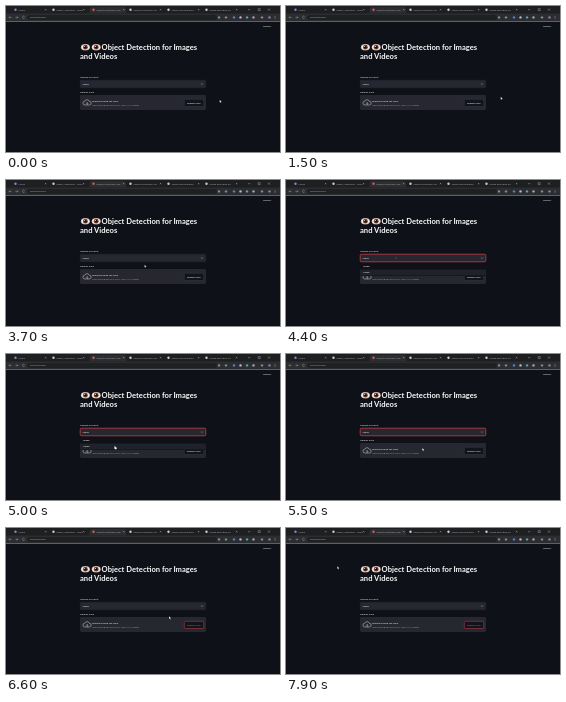
An HTML page that plays this animation: 274x146 px, repeating every 8000 ms.

```html
<!DOCTYPE html>
<html lang="en">
<head>
<meta charset="utf-8">
<title>Object detection app</title>
<style>
  html, body { margin: 0; width: 100%; height: 100%; overflow: hidden; background: #0e1117; }
  svg { display: block; width: 274px; height: 146px; }
  text { font-family: Lato, "Open Sans", sans-serif; fill: #fafafa; white-space: pre; }
  .small { font-size: 2.55px; }
  .title { font-size: 7.6px; font-weight: 700; }
  .chrome text { font-size: 2.5px; fill: #a5a7aa; }
  .line { fill: none; stroke: #b9bbc0; stroke-width: .4; }
</style>
</head>
<body>
<svg viewBox="0 0 274 146">
  <defs>
    <linearGradient id="accent">
      <stop offset="0" stop-color="#b9473f"/>
      <stop offset="1" stop-color="#9c5546"/>
    </linearGradient>
    <g id="eye">
      <ellipse rx="4.5" ry="3.3" fill="#c99a8c"/>
      <ellipse rx="4" ry="2.6" fill="#f1eeea"/>
      <circle r="2.4" fill="#6b4437"/>
      <circle r="1.3" fill="#17110f"/>
      <circle cx="-.7" cy="-.8" r=".5" fill="#fff"/>
    </g>
  </defs>
  <rect width="274" height="146" fill="#0e1117"/>

  <g class="chrome">
    <rect width="274" height="8" fill="#1e1f21"/>
    <rect y="7.5" width="274" height="7.7" fill="#2c2d30"/>
    <path d="M82 7.6Q83.5 7.4 83.5 6V3Q83.5 1 85.5 1H118Q120 1 120 3V6Q120 7.4 121.5 7.6Z" fill="#2c2d30"/>
    <rect x="21" y="8.9" width="190" height="5" rx="2.5" fill="#1f2022"/>
    <g id="tabs"></g>
    <text x="24" y="12.4">localhost:8501</text>
    <path class="line" d="M5.5 11.4H3l1-1m-1 1l1 1M9.5 11.4H12l-1-1m1 1l-1 1M18.6 10.5a1.2 1.2 0 1 0 .1 1.5"/>
    <g id="tools"></g>
    <path class="line" d="M242 3.7h2.3M252.2 2.6h2v2h-2zM262 2.6l2 2m0-2l-2 2"/>
    <path d="M269 10v3" stroke="#c5c7ca" stroke-width=".6" stroke-dasharray=".6 .5"/>
  </g>
  <rect y="15.1" width="274" height=".9" fill="url(#accent)"/>

  <text class="small" x="257.3" y="21.3">Deploy</text>
  <use href="#eye" x="79.4" y="41.2"/>
  <use href="#eye" x="90.2" y="41.2"/>
  <text class="title" x="95.6" y="44">Object Detection for Images</text>
  <text class="title" x="74" y="53">and Videos</text>

  <text class="small" x="74" y="72.3">Choose an Input</text>
  <rect id="select" x="74.2" y="74.2" width="125.6" height="7.6" rx="1.3" fill="#262730" stroke-width=".6"/>
  <text class="small" x="76.5" y="79">Video</text>
  <path class="line" d="M194.8 77.5l1.2 1.1 1.2-1.1"/>

  <text class="small" x="74" y="87.3">Upload a file</text>
  <rect x="74" y="89" width="126" height="15" rx="1.4" fill="#262730"/>
  <path d="M79 99a1.9 1.9 0 0 1-.2-3.8a2.4 2.4 0 0 1 4.5.1a1.8 1.8 0 0 1 .1 3.7zM81.2 99v-2.4m-.9.9l.9-.9.9.9" fill="none" stroke="#c7c9d0" stroke-width=".55"/>
  <text class="small" x="86.3" y="95.9">Drag and drop file here</text>
  <text x="86.3" y="99.9" font-size="2.25" style="fill:#9b9da5">Limit 200MB per file • MP4, MOV, AVI, MPEG4</text>
  <rect id="button" x="178.3" y="93.3" width="19.4" height="7.2" rx="1.3" fill="#11141c" stroke-width=".4"/>
  <text id="browse" class="small" x="181.2" y="97.8">Browse files</text>

  <g id="menu">
    <rect x="74" y="83" width="126" height="13" rx="1.3" fill="#0e1117"/>
    <rect x="74" y="89.5" width="126" height="6" fill="#1f222b"/>
    <text class="small" x="77" y="87.1">Image</text>
    <text class="small" x="77" y="93.2">Video</text>
  </g>

  <g id="cursor">
    <path id="arrow" d="M0 0V2.8L.7 2.2L1.2 3.2L1.6 3L1.2 2H2Z" fill="#fff" stroke="#111" stroke-width=".15"/>
    <path id="hand" d="M.5 0Q.9 0 .9 .5V1.3L2.2 1.6Q2.6 1.8 2.4 2.5L2.1 3.5H.6L-.5 2Q-.4 1.5 .1 1.9V.5Q.1 0 .5 0Z" fill="#fff" stroke="#111" stroke-width=".15"/>
    <path id="beam" d="M0-1.2V1.2" stroke="#8b8d93" stroke-width=".3"/>
  </g>
</svg>
<script>
const LOOP = 8000;
const RED = '#ff4b4b';
const $ = id => document.getElementById(id);

const tabs = [
  [8, '#8b7cf0', 'Home'],
  [46, '#c9cbd0', 'object_detection - main'],
  [86, '#e4574f', 'Object Detection App'],
  [123, '#c9cbd0', 'Object Detection Vid'],
  [161, '#c9cbd0', 'Video processing do'],
  [199, '#c9cbd0', 'Image detection no']
];
$('tabs').innerHTML = tabs.map(([x, color, label]) => `
  <circle cx="${x + 1.5}" cy="3.7" r="1.2" fill="${color}"/>
  <text x="${x + 4.5}" y="4.6">${label}</text>
  <path class="line" d="M${x + 31} 3l1.3 1.3m0-1.3l-1.3 1.3"/>`).join('');

const tools = [[213, '#85878a'], [220, '#85878a'], [228, '#4b83d6'], [234.5, '#b9bcc2'],
  [241, '#59a0a8'], [247.5, '#a7a9ae'], [256, '#85878a'], [263.5, '#8f7bb8']];
$('tools').innerHTML = tools.map(([x, color]) =>
  `<circle cx="${x}" cy="11.4" r="1.2" fill="${color}"/>`).join('');

// time, x, y
const path = [
  [0, 213.7, 93.8], [500, 213.7, 93.8], [900, 214.5, 92], [1500, 214.7, 90.8],
  [1900, 216.5, 89], [2300, 223, 86], [2700, 224.3, 85], [2800, 196, 94],
  [3000, 181, 95], [3400, 160, 92], [3600, 150, 88], [3900, 116, 78], [4400, 110, 78],
  [4700, 109, 86], [5000, 108.4, 91.8], [5300, 108.4, 92], [5600, 150, 95],
  [5900, 186.3, 96.8], [6400, 186.3, 96.8], [6800, 140, 80],
  [7100, 84, 55], [7400, 68, 47], [7800, 51.3, 38.3], [8000, 51.3, 38.3]
];

function cursorAt(t) {
  const i = path.findIndex(p => p[0] > t);
  const [a, b] = [path[i - 1], path[i]];
  const k = (t - a[0]) / (b[0] - a[0]);
  return [a[1] + (b[1] - a[1]) * k, a[2] + (b[2] - a[2]) * k];
}

const show = (id, on) => $(id).setAttribute('visibility', on ? 'visible' : 'hidden');

function draw(t) {
  const [x, y] = cursorAt(t);
  const inside = (left, top, right, bottom) => x > left && x < right && y > top && y < bottom;
  const menuOpen = t >= 4000 && t < 5300;
  const overButton = !menuOpen && inside(178, 93, 198, 101);
  const overSelect = inside(74, 74, 200, 82) && t < 5300;
  const overOption = menuOpen && inside(74, 83, 200, 96);
  const buttonRed = overButton || t >= 6300;
  const hand = overButton || overOption;

  $('cursor').setAttribute('transform', `translate(${x} ${y})`);
  show('hand', hand);
  show('beam', overSelect);
  show('arrow', !hand && !overSelect);
  show('menu', menuOpen);
  $('select').setAttribute('stroke', t >= 4000 && t < 6300 ? RED : '#262730');
  $('button').setAttribute('stroke', buttonRed ? RED : '#41434c');
  $('browse').style.fill = buttonRed ? RED : '#fafafa';
}

function tick(now) {
  draw(now % LOOP);
  requestAnimationFrame(tick);
}
draw(0);
requestAnimationFrame(tick);
</script>
</body>
</html>
```
